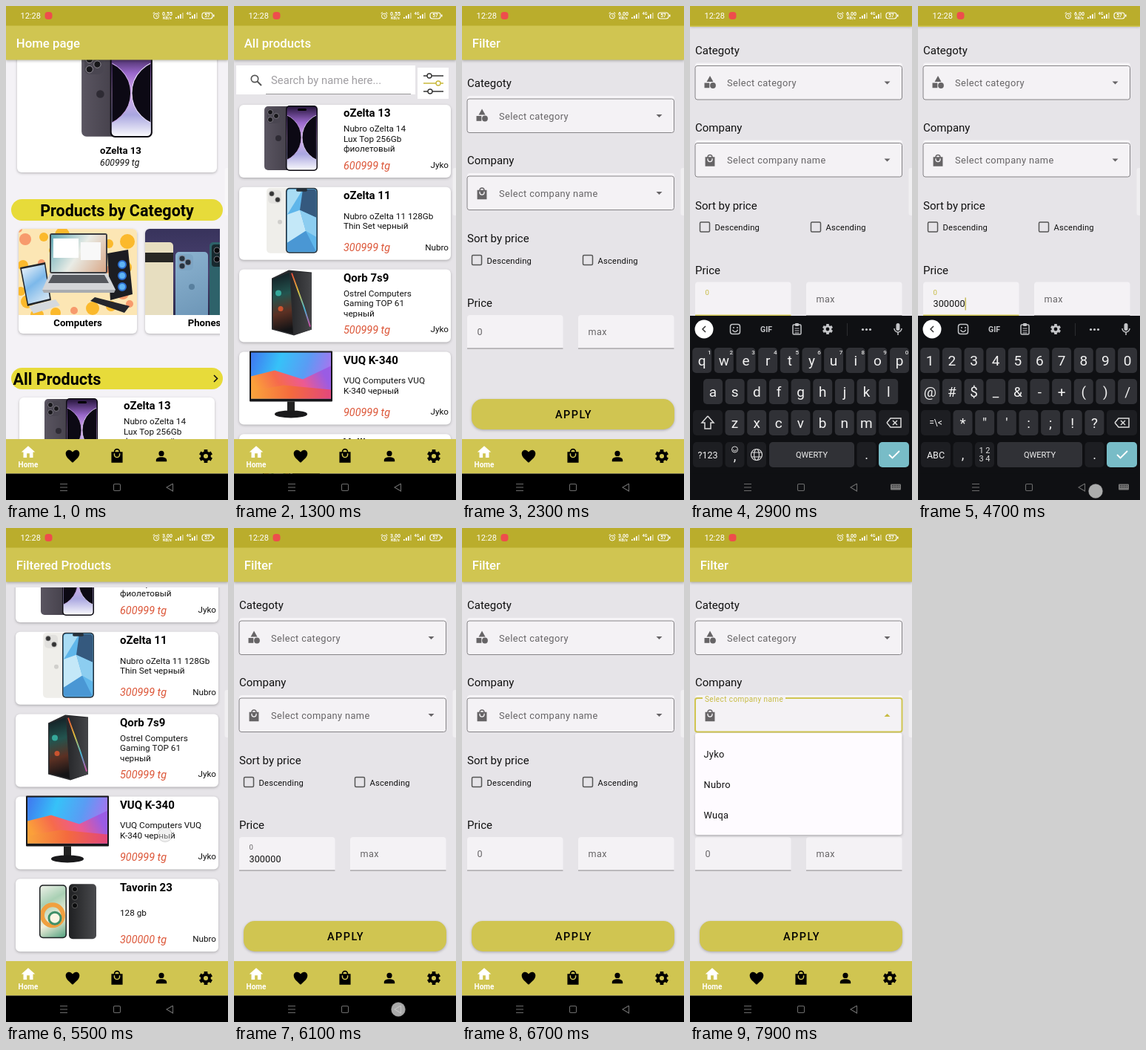
Write an HTML page with a canvas that moves like this. It is 300 by 665 pixels and loops after 8000 ms.

```html
<!DOCTYPE html>
<html lang="en">
<head>
<meta charset="utf-8">
<title>Shop app</title>
<style>
html, body { margin: 0; width: 100%; height: 100%; overflow: hidden; background: #000; }
canvas { display: block; width: 300px; height: 665px; }
</style>
</head>
<body>
<canvas id="stage"></canvas>
<script>
const LOOP = 8000, W = 300, H = 665;
const GOLD = '#d0c551', STATUS = '#baad2c', PILL = '#e7db3a', PALE = '#e6e4e8', FIELD = '#f4f2f5';
const INK = '#111', GREY = '#666466', KEYBOARD = '#0f1013', SYSTEM = '#6c6c6c';

const canvas = document.getElementById('stage'), c = canvas.getContext('2d');
const ratio = window.devicePixelRatio || 1;
canvas.width = W * ratio;
canvas.height = H * ratio;

// ---------- drawing helpers ----------
function box(x, y, w, h, fill, r = 0, stroke, line = 1) {
  c.beginPath();
  c.roundRect(x, y, w, h, r);
  if (fill) { c.fillStyle = fill; c.fill(); }
  if (stroke) { c.strokeStyle = stroke; c.lineWidth = line; c.stroke(); }
}
function raised(x, y, w, h, fill, r) {
  c.save();
  c.shadowColor = 'rgba(0,0,0,.25)';
  c.shadowBlur = 3.5 * ratio;
  c.shadowOffsetY = 1.2 * ratio;
  box(x, y, w, h, fill, r);
  c.restore();
}
function disc(x, y, r, fill, stroke, line = 1) {
  box(x - r, y - r, 2 * r, 2 * r, fill, r, stroke, line);
}
function poly(points, fill, stroke, line = 1) {
  c.beginPath();
  points.forEach(([x, y]) => c.lineTo(x, y));
  if (fill) { c.closePath(); c.fillStyle = fill; c.fill(); }
  if (stroke) { c.strokeStyle = stroke; c.lineWidth = line; c.stroke(); }
}
function shape(d, x, y, scale, fill) {
  at(x, y, scale, () => { c.fillStyle = fill; c.fill(new Path2D(d), 'evenodd'); });
}
// y is the middle of the capitals
function text(s, x, y, size, { color = INK, weight = 400, align = 'left', italic = '', spacing = 0 } = {}) {
  c.font = `${italic} ${weight} ${size}px Roboto, sans-serif`;
  c.letterSpacing = spacing + 'px';
  c.textAlign = align;
  c.fillStyle = color;
  c.fillText(s, x, y + size * .36);
}
function at(x, y, scale, draw) {
  c.save();
  c.translate(x, y);
  c.scale(scale, scale);
  draw();
  c.restore();
}
function clipped(x, y, w, h, draw, r = 0) {
  c.save();
  c.beginPath();
  c.roundRect(x, y, w, h, r);
  c.clip();
  draw();
  c.restore();
}
function blend(x0, y0, x1, y1, ...colors) {
  const g = c.createLinearGradient(x0, y0, x1, y1);
  colors.forEach((color, i) => g.addColorStop(i / (colors.length - 1), color));
  return g;
}
function ease(t, from, to) {
  const p = Math.min(1, Math.max(0, (t - from) / (to - from)));
  return 1 - (1 - p) ** 3;
}

// ---------- icons ----------
const BAG = 'M-7-4.5H-4A4 4 0 0 1 4-4.5H7V9H-7ZM-2.4-4.5H2.4A2.4 2.4 0 0 0-2.4-4.5ZM-4-2.5V-1A4 4 0 0 0 4-1V-2.5H2.6V-1A2.6 2.6 0 0 1-2.6-1V-2.5Z';
const HEART = 'M0 9C-5 4.5-9.5 1-9.5-3.5C-9.5-9-3-10.5 0-5.5C3-10.5 9.5-9 9.5-3.5C9.5 1 5 4.5 0 9Z';
const HOUSE = 'M0-9L10 0H7V8H2V2H-2V8H-7V0H-10Z';
const PERSON = 'M-4-4A4 4 0 1 1 4-4A4 4 0 1 1-4-4ZM-8 8V6C-8 0 8 0 8 6V8Z';

function gear(x, y, r, color) {
  at(x, y, 1, () => {
    disc(0, 0, r * .55, null, color, r * .42);
    c.fillStyle = color;
    for (let i = 0; i < 6; i++) {
      c.rotate(Math.PI / 3);
      c.fillRect(-r * .26, -r, r * .52, r * .45);
    }
  });
}
function caret(x, y, color, dir = 1) {
  poly([[x - 4, y - 2 * dir], [x + 4, y - 2 * dir], [x, y + 2 * dir]], color);
}

// ---------- product pictures, centred on 0,0 ----------
function handset(x, y, w, h, body, screen) {
  box(x, y, w, h, body, 5);
  if (screen) box(x + 1.5, y + 1.5, w - 3, h - 3, screen, 4);
}
function lenses(x, y, r, color, gap) {
  [[0, 0], [0, gap], [gap * .8, gap / 2]].forEach(([dx, dy]) => disc(x + dx, y + dy, r, color, '#9a96a0', .7));
}
function purplePhones() {
  handset(-36, -43, 40, 86, blend(-36, 0, 4, 0, '#5a5561', '#403c46'));
  box(-33, -40, 19, 20, '#4a4651', 5);
  lenses(-28, -35, 3.5, '#17161a', 10);
  disc(-17, 0, 4, '#2e2b34');
  handset(-7, -44, 43, 88, '#0d0b12', blend(0, -42, 0, 42, '#2a1840', '#9a68cc', '#d9b0ee', '#a9a6e0', '#f6f6fb'));
  clipped(-5, -42, 39, 84, () => {
    disc(-19, -1, 33, '#0c0914', '#c9a6e6', .8);
    disc(48, -1, 33, '#0c0914', '#e9defa', .8);
  }, 4);
  box(9, -40, 12, 3, '#000', 2);
}
function bluePhones() {
  handset(-33, -44, 40, 88, '#efeeea');
  box(-31, -41, 18, 18, '#e2e1de', 5);
  [[-26, -36], [-18, -28]].forEach(([x, y]) => disc(x, y, 3.2, '#333', '#888', .6));
  disc(-15, 2, 3, '#d0cfcc');
  handset(-7, -44, 43, 88, '#26303a', '#5fb6ea');
  clipped(-5, -42, 39, 84, () => {
    poly([[-5, -42], [16, -42], [-5, -8]], '#a9dcf4');
    poly([[16, -42], [34, -42], [34, -4], [12, -14]], '#35597e');
    poly([[-5, -8], [12, -14], [20, 14], [-5, 30]], '#c4e8f8');
    poly([[12, -14], [34, -4], [34, 22], [20, 14]], '#8ccdf0');
    poly([[-5, 30], [20, 14], [34, 42], [-5, 42]], '#4a97d4');
  }, 4);
  box(7, -43, 15, 4, '#26303a', 2);
}
function tower() {
  poly([[-26, -33], [-3, -44], [28, -41], [28, 36], [4, 44], [-26, 36]], '#2a2b2e');
  poly([[-25, -32], [-2, -41], [3, 42], [-24, 35]], blend(-25, -32, -5, 36, '#16272b', '#23544f', '#5b3023', '#141416'));
  poly([[-1, -42], [28, -40], [28, 36], [4, 43]], blend(0, 0, 28, 0, '#26272a', '#454649'));
  disc(-17, -13, 4, '#35a89a');
  disc(-14, 8, 3.5, '#c9532f');
  poly([[1, -40], [17, 4], [26, 32]], null, blend(0, -40, 0, 32, '#e8483a', '#e2c33a', '#44b8d8', '#d548a0'), 1.8);
}
function monitor() {
  box(-56, -46, 112, 68, '#17171a', 1);
  box(-54, -44, 108, 62, blend(-50, -44, 54, -10, '#3f7df0', '#36c2f8', '#5a9cf4', '#b070ee'));
  poly([[-54, -12], [-22, -20], [16, -8], [54, -26], [54, 18], [-54, 18]], blend(-40, 18, 40, -24, '#fba03a', '#f66a4c', '#ec5a92', '#9a5ce4'));
  poly([[-54, 8], [-10, 0], [54, 6], [54, 18], [-54, 18]], blend(-54, 0, 54, 0, '#f9a43c', '#f46a3e', '#e2477c'));
  box(-5, 22, 10, 15, '#222');
  c.beginPath();
  c.ellipse(0, 39, 22, 5, 0, 0, 7);
  c.fillStyle = '#19191b';
  c.fill();
}
function darkPhones() {
  handset(-38, -37, 37, 72, '#1d2023', blend(-38, -36, 0, 30, '#f0f2ea', '#a9d0b4', '#f2efdc', '#5da685'));
  clipped(-36, -35, 33, 68, () => {
    disc(-20, 4, 14, null, '#f0a040', 6);
    disc(-17, 8, 8, '#fbf6e4', '#3f8f68', 3);
  }, 4);
  handset(2, -38, 37, 74, blend(2, 0, 39, 0, '#1f2022', '#4a4b4e'));
  [-31, -20, -9].forEach(y => disc(10, y, 3.6, '#0b0c0d', '#777', .7));
}
function computersPicture() {
  box(0, 0, 160, 116, '#fce6b4');
  for (let i = 0; i < 30; i++)
    disc(i * 47 % 163, i * 29 % 119, 5 + i * 7 % 6, i % 3 ? '#fbb92c' : '#f79a6c');
  poly([[2, 52], [36, 45], [44, 96], [12, 104]], '#20252c');
  poly([[4, 54], [35, 48], [42, 94], [13, 101]], blend(5, 50, 40, 95, '#eef4fa', '#7cb8ea', '#d5e6f4'));
  poly([[14, 104], [50, 95], [56, 103], [20, 114]], '#d5d9de');
  poly([[120, 33], [148, 28], [154, 88], [124, 96]], '#1c1d22');
  [48, 63, 78].forEach(y => disc(140, y, 5, '#5fb4f4', '#2c6ed0', 2));
  box(42, 6, 78, 54, '#3a3c40', 3);
  box(44, 8, 74, 50, blend(44, 8, 118, 58, '#5fa7b4', '#e9ece6', '#d9a888'));
  box(47, 13, 34, 26, '#fff');
  box(84, 18, 27, 24, '#f8f8f8');
  poly([[42, 60], [120, 60], [131, 82], [32, 82]], '#d3d5d8');
  poly([[46, 62], [116, 62], [122, 73], [40, 73]], '#55585e');
  poly([[32, 82], [131, 82], [129, 86], [34, 86]], '#a9acb0');
  poly([[97, 97], [103, 92], [150, 104], [143, 113]], '#25272c');
}
function phonesPicture() {
  box(0, 0, 160, 116, blend(0, 0, 0, 116, '#38335c', '#4a4270', '#2c2b4e'));
  handset(-4, 18, 42, 104, '#e7dec0');
  box(-4, 32, 42, 13, '#282724');
  handset(41, 31, 44, 92, blend(41, 31, 85, 120, '#8cb3d0', '#6c95b6'));
  box(44, 34, 21, 22, '#7da5c4', 5);
  lenses(50, 40, 4, '#27333f', 10);
  disc(63, 78, 4, '#59809f');
  handset(87, 18, 46, 104, '#2e626a');
  box(90, 21, 26, 30, '#17292e', 4);
  lenses(97, 29, 4, '#070a0c', 12);
}

const oZelta13 = { name: 'oZelta 13', lines: ['Nubro oZelta 14', 'Lux Top 256Gb', 'фиолетовый'], price: 600999, brand: 'Jyko', art: purplePhones };
const oZelta11 = { name: 'oZelta 11', lines: ['Nubro oZelta 11 128Gb', 'Thin Set черный'], price: 300999, brand: 'Nubro', art: bluePhones };
const qorb = { name: 'Qorb 7s9', lines: ['Ostrel Computers', 'Gaming TOP 61', 'черный'], price: 500999, brand: 'Jyko', art: tower };
const vuq = { name: 'VUQ K-340', lines: ['VUQ Computers VUQ', 'K-340 черный'], price: 900999, brand: 'Jyko', art: monitor };
const tavorin = { name: 'Tavorin 23', lines: ['128 gb'], price: 300000, brand: 'Nubro', art: darkPhones };
const vullim = { name: 'Vullim', lines: ['256 gb'], price: 400000, brand: 'Jyko', art: darkPhones };
const allProducts = [oZelta13, oZelta11, qorb, vuq, vullim];
const filtered = [oZelta13, oZelta11, qorb, vuq, tavorin];

function productCard(p, x, y, w) {
  raised(x, y, w, 98, '#fff', 6);
  at(x + 70, y + 45, 1, p.art);
  const left = x + 141;
  text(p.name, left, y + 11, 15, { weight: 700, color: '#000' });
  p.lines.forEach((line, i) => text(line, left, y + 45.5 + (i - (p.lines.length - 1) / 2) * 13.7, 11.75));
  text(p.price + ' tg', left, y + 81.5, 14.4, { italic: 'italic', color: '#dc5638' });
  text(p.brand, x + w - 3, y + 80.5, 11.7, { align: 'right' });
}

// ---------- pages ----------
function header(title) {
  raised(0, 26, W, 46.5, GOLD, 0);
  text(title, 13.7, 50, 16.8, { weight: 500, color: '#fff' });
}
function homePage(t) {
  box(0, 26, W, 557, '#f4f2f6');
  c.save();
  c.translate(0, -24 * ease(t, 40, 320));
  raised(15, 20, 270, 204, '#fff', 6);
  at(150, 118.5, 1.33, purplePhones);
  text('oZelta 13', 127, 194, 13.2, { weight: 700, color: '#000' });
  text('600999 tg', 127, 211, 12.2, { italic: 'italic' });
  box(7, 260, 286, 29, PILL, 14.5);
  text('Products by Categoty', 150, 275.5, 21.5, { weight: 700, align: 'center', color: '#000' });
  clipped(14, 296, 275, 150, () => [['Computers', computersPicture], ['Phones', phonesPicture]].forEach(([name, picture], i) => {
    const x = 17 + i * 171;
    raised(x, 300, 160, 141, '#fff', 6);
    clipped(x, 300, 160, 116, () => at(x, 300, 1, picture), [6, 6, 0, 0]);
    text(name, x + 80, 426, 13.2, { weight: 700, align: 'center', color: '#000' });
  }));
  box(7, 487, 286, 29, PILL, 14.5);
  text('All Products', 9.5, 502.5, 21.6, { weight: 700, color: '#000' });
  poly([[281, 497], [285.5, 501.5], [281, 506]], null, '#111', 1.6);
  productCard(oZelta13, 18, 527, 264);
  c.restore();
  header('Home page');
}
function allPage(t) {
  box(0, 26, W, 557, PALE);
  box(3, 80, 242, 39, '#fff');
  disc(28, 98, 4.7, null, '#555', 1.7);
  poly([[31.5, 101.5], [37, 107]], null, '#555', 2);
  text('Search by name here...', 50, 100, 14.8, { color: '#a09ea2' });
  box(43, 118, 196, 1, '#999');
  box(248, 83, 42, 42, '#fff');
  [[94, 264], [104, 276], [115, 265]].forEach(([y, knob], i) => {
    const color = i === 1 ? '#c9b83a' : '#333';
    poly([[256, y], [283, y]], null, color, 1.5);
    disc(knob, y, 3, '#fff', color, 1.4);
  });
  c.save();
  c.globalAlpha *= ease(t, 1080, 1280);
  allProducts.forEach((p, i) => productCard(p, 7, 133 + 110.8 * i, 286));
  c.restore();
  header('All products');
}
function filteredPage(t) {
  box(0, 26, W, 557, PALE);
  clipped(0, 80, W, 503, () =>
    filtered.forEach((p, i) => productCard(p, 13, 86 - listScroll(t) + 110.8 * i, 274)));
  header('Filtered Products');
}
function selectField(y, label, hint, open) {
  text(label, 7, y - 21, 15);
  box(7, y - 4, 280, 20, '#f6f4f7', 4);
  box(7, y, 279.5, 45.5, FIELD, 3, open ? GOLD : '#858386', open ? 2 : 1);
  if (open) {
    box(17, y - 2, 112, 4, FIELD);
    text(hint, 20, y + 1, 10, { color: '#c7bb42', spacing: .4 });
  } else text(hint, 50, y + 23, 12.8, { color: GREY, spacing: .4 });
  caret(266.5, y + 23, open ? '#c7bb42' : GREY, open ? -1 : 1);
}
function priceField(x, hint, value, focused) {
  const color = focused ? '#c7bb42' : GREY;
  box(x, 416, 129.5, 45, FIELD, [4, 4, 0, 0]);
  box(x, focused ? 460 : 460.5, 129.5, focused ? 2 : 1, focused ? GOLD : '#8a888a');
  if (!focused && !value) return text(hint, x + 13.5, 438.5, 12.6, { color, spacing: .4 });
  text(hint, x + 13.5, 430, 9.6, { color });
  text(value, x + 13.5, 445, 12.6, { spacing: .1 });
  if (focused && value) box(x + 13.5 + c.measureText(value).width, 437, 1.2, 17, '#b9ad33');
}
function filterPage(t) {
  const again = t > 6350, menu = ease(t, 7250, 7480);
  box(0, 26, W, 557, PALE);
  selectField(125, 'Categoty', 'Select category', false);
  poly([[27, 138.5], [31.5, 146.5], [22.5, 146.5]], GREY);
  box(19.5, 148, 6.8, 6.8, GREY);
  disc(31, 151.5, 3.9, GREY);
  selectField(229, 'Company', 'Select company name', menu > 0);
  shape(BAG, 27, 252, .92, GREY);
  text('Sort by price', 7, 313, 15);
  [['Descending', 13], ['Ascending', 163]].forEach(([name, x]) => {
    box(x + .5, 335.5, 13, 13, null, 1.5, '#555', 1.5);
    text(name, x + 20.5, 342.5, 11.2, { spacing: .2 });
  });
  text('Price', 7, 400, 15);
  priceField(7, '0', again ? '' : typed(t), t > 2640 && t < 5000);
  priceField(157, 'max', '', false);
  raised(13, 529, 274, 41, GOLD, 15);
  text('APPLY', 151, 550, 14.4, { weight: 500, align: 'center', spacing: 1.5, color: '#000' });
  if (menu) {
    raised(7, 276, 279.5, 137 * menu, '#fefbff', 3);
    clipped(7, 276, 280, 137 * menu, () =>
      ['Jyko', 'Nubro', 'Wuqa'].forEach((s, i) => text(s, 18.5, 304 + 41.4 * i, 12.8, { spacing: .3 })));
  }
  header('Filter');
}

// ---------- keyboard ----------
const ROW_Y = [477, 519, 561, 604];
const LETTERS = ['qwertyuiop', 'asdfghjkl', 'zxcvbnm'], SYMBOLS = ['1234567890', '@#$_&-+()/', '*"\':;!?'];

function key(label, x, y, w, size = 19, fill = '#303136') {
  box(x - w / 2, y - 17, w, 34, fill, 5);
  text(label, x, y, size, { color: '#f2f2f2', align: 'center' });
}
function keyPopup(label, x) {
  box(x - 15, 418, 30, 76, '#4a4b51', 6);
  text(label, x, 437, 22, { color: '#fff', align: 'center' });
}
function keyboard(t) {
  const symbols = t >= 3230, dark = '#1d1e22', pale = '#c4c5c8';
  box(0, 417, W, 248, KEYBOARD);
  disc(19, 435, 12.5, '#fff');
  poly([[21, 431], [17, 435], [21, 439]], null, '#333', 1.5);
  box(54.5, 428.5, 13, 13, null, 3, pale, 1.5);
  disc(59, 433, 1, pale);
  disc(64, 433, 1, pale);
  c.beginPath(); c.arc(61, 435, 3.5, .2, 2.9); c.stroke();
  text('GIF', 103, 435.5, 10.5, { weight: 700, color: pale, align: 'center' });
  box(139, 429, 11, 13, null, 1.5, pale, 1.5);
  box(142, 427, 5, 4, pale, 1);
  [434, 437, 440].forEach(y => box(141.5, y - .5, 6, 1, pale));
  gear(186, 435, 7, pale);
  box(212, 427, 1, 17, '#2c2d30');
  [233.5, 238.5, 243.5].forEach(x => disc(x, 435.5, 1.6, pale));
  box(278.5, 427, 5, 10, pale, 2.5);
  c.beginPath(); c.arc(281, 434, 5, 0, Math.PI); c.stroke();
  box(280.3, 439, 1.5, 4, pale);

  (symbols ? SYMBOLS : LETTERS).forEach((row, r) => [...row].forEach((ch, i) => {
    const x = (r === 2 ? 60.5 : row.length === 9 ? 31 : 16.2) + i * 29.65;
    key(ch, x, ROW_Y[r], 26);
    if (!symbols && r === 0) text((i + 1) % 10, x + 10, 466, 8, { color: '#ddd', align: 'center', weight: 500 });
  }));
  key(symbols ? '=\\<' : '', 24, 561, 40, 12, dark);
  if (!symbols) poly([[24, 552], [32, 561], [28, 561], [28, 569], [20, 569], [20, 561], [16, 561], [24, 552]], null, '#ddd', 1.5);
  key('', 275.5, 561, 41, 12, dark);
  poly([[266, 561], [271, 555], [285, 555], [285, 567], [271, 567], [266, 561]], null, '#ddd', 1.5);
  poly([[274, 558], [280, 564]], null, '#ddd', 1.4);
  poly([[280, 558], [274, 564]], null, '#ddd', 1.4);
  key(symbols ? 'ABC' : '?123', 24, 604, 40, 12.5, dark);
  key('', 60.5, 604, 26, 18, dark);
  text(',', 60.5, symbols ? 604 : 606, 18, { color: '#eee', align: 'center' });
  key('', 90, 604, 26, 18, dark);
  if (symbols) ['1 2', '3 4'].forEach((s, i) => text(s, 90, 598.5 + 11 * i, 11, { color: '#ddd', align: 'center' }));
  else {
    disc(60.5, 597, 4, null, '#ddd', 1);
    c.beginPath(); c.arc(60.5, 597, 2, 0, Math.PI); c.stroke();
    disc(90, 604, 7.5, null, '#ddd', 1.2);
    c.beginPath(); c.ellipse(90, 604, 3.4, 7.5, 0, 0, 7); c.stroke();
    [601, 607].forEach(y => poly([[83, y], [97, y]], null, '#ddd', 1));
  }
  key('QWERTY', 164.5, 604, 115, 11);
  key('.', 238.5, 604, 26, 18, dark);
  box(255, 587, 41, 34, '#78bcc7', 5);
  poly([[269, 604], [273.5, 608.5], [283, 599]], null, '#fff', 1.8);

  if (t > 3330 && t < 3440) keyPopup('3', 75.5);
  ZERO_TIMES.forEach(z => { if (t >= z && t < z + 95) keyPopup('0', 283); });
}

// ---------- timeline ----------
const ZERO_TIMES = [0, 1, 2, 3, 4].map(i => 3590 + 182 * i);
const typed = t => t < 3390 ? '' : '3' + '0'.repeat(ZERO_TIMES.filter(z => t >= z).length);
const listScroll = t => 57 * (ease(t, 5405, 5490) - ease(t, 5610, 5850));
const speed = t => t < 1900 ? '0.55' : t < 4950 ? '6.00' : t < 7690 ? '3.00' : '8.00';

const VISITS = [
  [-1000, homePage], [860, allPage], [1860, filterPage], [5080, filteredPage],
  [5890, filterPage], [6120, allPage], [6400, filterPage]
];
const TOUCHES = [
  [790, 910, 283, 480], [1850, 1950, 269, 104], [2590, 2690, 70, 440], [3190, 3270, 24, 604],
  [4600, 4760, 240, 653], [4990, 5100, 150, 550], [5410, 5840, 215, 470], [5870, 5960, 222, 648],
  [6090, 6170, 222, 648], [6390, 6480, 269, 104], [6990, 7080, 150, 252]
];

function pages(t) {
  const now = VISITS.findLastIndex(([start]) => t >= start);
  const [start, page] = VISITS[now], p = ease(t, start, start + 200);
  if (p < 1) VISITS[now - 1][1](t);
  c.save();
  c.globalAlpha = p;
  c.translate(0, 30 * (1 - p));
  page(t);
  c.restore();
}
function tabBar() {
  box(0, 583, W, 46.5, GOLD);
  shape(HOUSE, 30, 600.5, .93, '#fff');
  text('Home', 30, 617.5, 10, { weight: 700, color: '#fff', align: 'center' });
  shape(HEART, 90, 606, .98, '#000');
  shape(BAG, 150, 605, 1.08, '#000');
  shape(PERSON, 210, 606, .9, '#000');
  gear(270, 606, 9, '#000');
}
function statusBar(t) {
  box(0, 0, W, 26.5, STATUS);
  text('12:28', 19.5, 13, 11, { color: '#fff' });
  box(52.5, 8, 10, 10, '#ee4d4c', 4);
  disc(203, 13.5, 3.5, null, '#fff', 1);
  poly([[203, 11.5], [203, 14], [205, 14]], null, '#fff', .8);
  poly([[198.5, 10], [201, 8.5]], null, '#fff', 1);
  poly([[205, 8.5], [207.5, 10]], null, '#fff', 1);
  text(speed(t), 218, 10.5, 7, { color: '#fff', weight: 700, align: 'center' });
  text('KB/s', 218, 16.5, 5.5, { color: '#fff', weight: 700, align: 'center' });
  [229, 248].forEach(x => [2, 4, 6, 8].forEach((h, i) => box(x + 3 * i, 17 - h, 1.7, h, i < 3 ? '#fff' : 'rgba(255,255,255,.5)')));
  text('4G', 247, 10, 5.5, { color: '#fff', weight: 700, align: 'center' });
  box(265, 9, 14, 8, null, 3, '#fff', 1.1);
  box(280, 11.5, 1.5, 3, '#fff');
  text('57', 272, 13, 6.5, { color: '#fff', weight: 700, align: 'center' });
}
function systemBar(open) {
  box(0, 629.5, W, 35.5, open ? KEYBOARD : '#000');
  [643.5, 648, 652.5].forEach(y => box(73, y - .5, 10, 1, SYSTEM));
  box(145.5, 643.5, 9, 9, null, 1.5, SYSTEM, 1.1);
  poly([[225.5, 643], [217, 648], [225.5, 653], [225.5, 643]], null, SYSTEM, 1.1);
  if (!open) return;
  box(271, 643.5, 14, 8, '#777', 1);
  for (let i = 0; i < 10; i++) box(273 + i % 5 * 2.3, 645 + Math.floor(i / 5) * 2.3, 1, 1, KEYBOARD);
}
function touches(t) {
  TOUCHES.forEach(([from, to, x, y]) => {
    if (t < from || t >= to) return;
    const drag = from === 5410 ? listScroll(t) : 0;
    disc(x, y - drag, 9.5, drag ? 'rgba(225,225,225,.45)' : 'rgba(225,225,225,.75)', 'rgba(140,140,140,.35)');
  });
}
function draw(t) {
  const shown = ease(t, 2650, 2880) - ease(t, 4760, 4960);
  c.setTransform(ratio, 0, 0, ratio, 0, 0);
  box(0, 0, W, H, '#000');
  c.save();
  c.translate(0, -44.5 * shown);
  clipped(0, 26, W, 604, () => { box(0, 26, W, 604, PALE); pages(t); tabBar(); });
  c.restore();
  if (shown > 0) at(0, 248 * (1 - shown), 1, () => keyboard(t));
  statusBar(t);
  systemBar(shown > .5);
  box(295.5, 218, 7, 64, 'rgba(255,255,255,.4)', 3);
  touches(t);
}

function frame(now) {
  draw(now % LOOP);
  requestAnimationFrame(frame);
}
requestAnimationFrame(frame);
</script>
</body>
</html>
```
